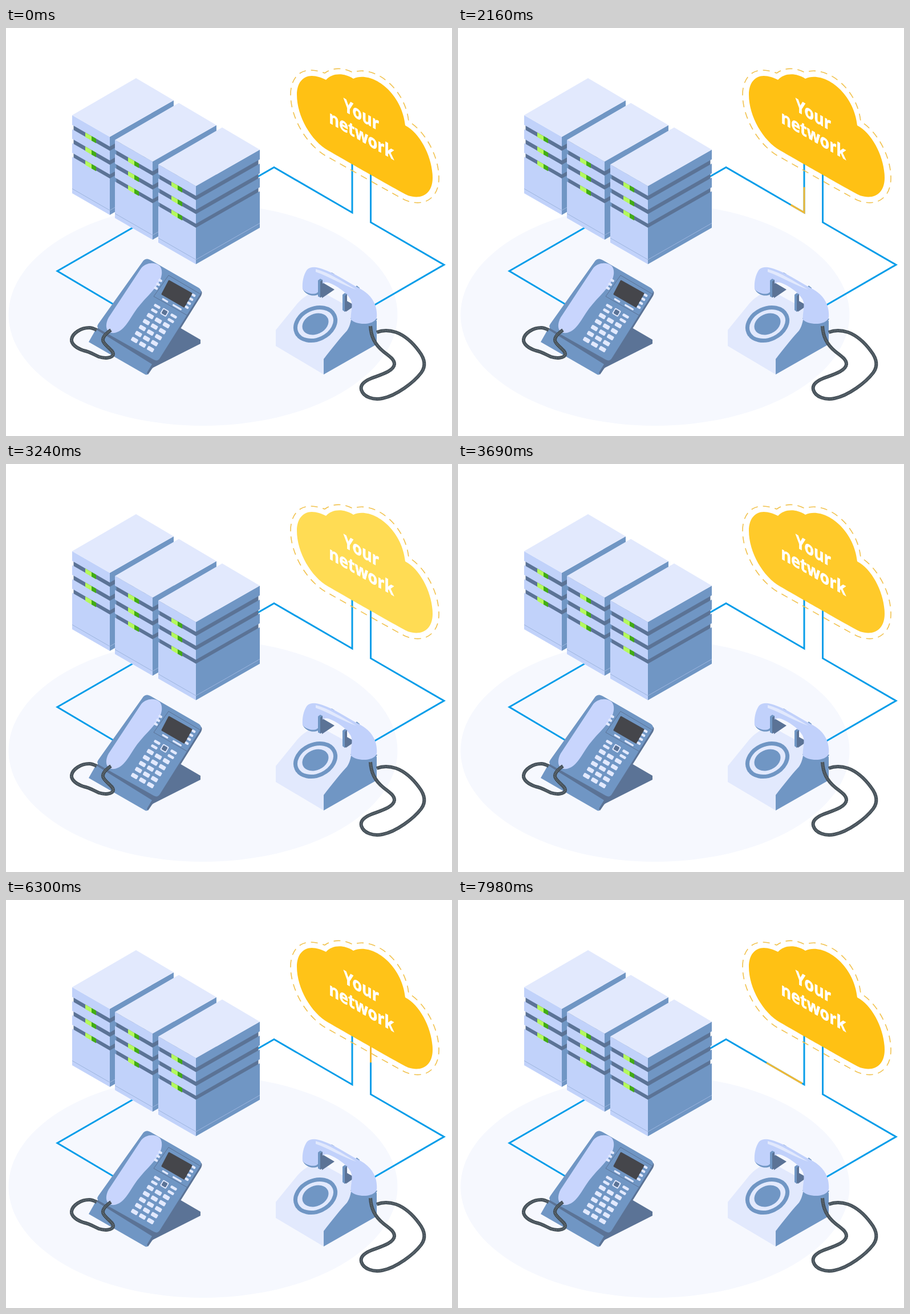
Write an HTML page that moves like this. It is 782x716 px and loops after 8 s.

```html
<!DOCTYPE html>
<html lang="en">
<head>
<meta charset="utf-8">
<title>Your network</title>
<style>
  html, body { margin: 0; width: 100%; height: 100%; overflow: hidden; background: #fff; }
  svg { display: block; width: 100%; height: 100%; }
  .pale { fill: #e2e9fd; }
  .soft { fill: #c1d2fa; }
  .mid { fill: #7096c4; }
  .dark { fill: #5b7396; }
  .wire { fill: none; stroke: #079de9; stroke-width: 3; }
  .pulse { fill: none; stroke: #f3b933; stroke-width: 3; stroke-dasharray: 72 2000; stroke-dashoffset: 72; }
  .cord { fill: none; stroke: #3f4a52; stroke-width: 6; }
  .coil { fill: none; stroke: #7d8890; stroke-width: 3.4; stroke-dasharray: .8 1.8; }
  #cloud { fill: #ffc114; }
  text { font: bold 31px "Open Sans", "Noto Sans", sans-serif; fill: #fff; stroke: #fff; stroke-width: .8; }
</style>
</head>
<body>
<svg viewBox="0 0 782 716" preserveAspectRatio="none">
  <ellipse cx="345.5" cy="503" rx="341" ry="195" fill="#f6f8fe"/>

  <g class="wire">
    <path d="M235 343L90 426.500L192 487"/>
    <path d="M436 264L470 244.500L607 324V225"/>
    <path d="M639.500 245V341L768 415.500L635 492.500"/>
  </g>
  <g id="pulses"></g>
  <g id="servers"></g>

  <g id="deskPhone">
    <path class="dark" d="M305 526L341 547V554L256 597L264 584Z"/>
    <path class="mid" d="M158 528L145 551L244 608Q248 610 251 605L262 586Z"/>
    <path class="dark" d="M158 529L162 526L268 583L256 598L249 608L247 605L256 590Z"/>
    <path class="dark" d="M342 461Q345 464 342 470L272 582Q267 589 260 586L262 580Z"/>
    <path class="mid" d="M241 408Q246 403 253 407L338 456Q344 460 341 466L270 579Q266 586 259 582L163 528Q158 525 162 519Z"/>
    <path d="M285 434L341 467L319 505L259 471Z" fill="none" stroke="#5b7396"/>
    <path d="M286 444L325 466L312 489L274 467Z" fill="#45464b" stroke="#45464b" stroke-width="3" stroke-linejoin="round"/>
    <path d="M236 423C244 411 262 410 270 418C276 426 273 440 266 450C258 462 242 476 230 492C221 504 216 515 207 525C199 534 188 538 180 533C174 528 175 517 180 508Z" fill="#c8d5fd"/>
    <g id="keys" class="pale"></g>
  </g>

  <g id="dialPhone">
    <path class="pale" d="M473 530L508 487C515 478 522 472 535 465L548 460L630 505L600 545L557 608L473 558Z"/>
    <path class="mid" d="M557 608V581C570 564 585 545 598 531C605 521 605 508 608 498L650 514V555Z"/>
    <g transform="rotate(-25 542.500 519.500)">
      <ellipse cx="542.500" cy="519.500" rx="36.500" ry="27.100" fill="none" stroke="#7096c4" stroke-width="7"/>
      <ellipse class="mid" cx="542.500" cy="519.500" rx="24" ry="17.700"/>
    </g>
    <path class="dark" d="M554 446L576 459L554 474Z"/>
    <path class="dark" d="M596 478L612 487L596 498Z"/>
    <path class="mid" d="M520 457C524 470 545 474 551 464V456Z"/>
    <path class="mid" d="M604 509C610 525 645 527 651 510Z"/>
    <path class="mid" d="M568 432L571 429L576 432V438H568ZM612 455L615 452L620 456V461H612Z"/>
    <path d="M528 424C534 418 545 419 555 423C578 431 596 444 616 455C640 466 652 485 650 508C646 522 615 522 605 512C603 500 610 488 604 476C597 464 580 452 566 447C556 444 552 450 549 460C546 470 528 468 520 458C519 445 522 432 528 424Z" fill="#c1d1fb"/>
    <path d="M543 423C568 430 590 445 614 459C592 452 566 436 543 428Z" class="pale"/>
    <path class="mid" d="M547 443L551 440L555 442V471L551 473L547 471Z"/>
    <path class="mid" d="M590 468L594 465L598 467V495L594 498L590 495Z"/>
    <path class="dark" d="M551 445L555 442V471L551 473ZM594 470L598 467V495L594 498Z"/>
  </g>

  <g id="cords"></g>

  <path d="M499 117C499 90 513 74 534 74C545 74 552 77 559 79C573 69 590 69 608 78C645 64 700 105 706 164C736 182 759 226 759 263C759 300 732 315 700 302C680 292 600 246 560 224C524 202 499 155 499 117Z" fill="none" stroke="#f1c24e" stroke-width="1.600" stroke-dasharray="12 9"/>
  <path id="cloud" d="M510 117C510 96 521 84 536 84C545 84 553 87 561 91C572 79 592 78 609 89C640 74 694 112 700 171C727 185 748 228 748 263C748 290 730 302 705 294C690 287 600 235 565 215C535 198 510 155 510 117Z"/>
  <text transform="matrix(.866 .5 0 1 592 145)">Your</text>
  <text transform="matrix(.866 .5 0 1 566.500 166)">network</text>
</svg>

<script>
const LOOP = 8000, DASH = 72, SPEED = 0.39;
const NS = 'http://www.w3.org/2000/svg';
const $ = id => document.getElementById(id);

function add(parent, tag, attrs) {
  const el = document.createElementNS(NS, tag);
  for (const k in attrs) el.setAttribute(k, attrs[k]);
  parent.append(el);
  return el;
}

// Isometric box walls between two heights, measured from the top face.
function wall(g, top, bottom, inset, left, right) {
  const x0 = inset, x1 = 178 - inset, k = 0.58 * inset;
  add(g, 'path', { class: left, d: `M${x0} ${top + k}L66 ${top + 38}V${bottom + 38}L${x0} ${bottom + k}Z` });
  add(g, 'path', { class: right, d: `M66 ${top + 38}L${x1} ${top - 26 + k}V${bottom - 26 + k}L66 ${bottom + 38}Z` });
}

function server(x, y) {
  const g = add($('servers'), 'g', { transform: `translate(${x} ${y})` });
  wall(g, 8, 84, 2.5, 'dark', 'dark');
  for (const [a, b] of [[0, 17], [24.5, 41.5], [49, 66], [73, 137]]) wall(g, a, b, 0, 'soft', 'mid');
  add(g, 'path', { class: 'pale', d: 'M0 0L112 -65L178 -26L66 38Z' });
  add(g, 'path', { d: 'M0 129L66 167L178 103', fill: 'none', stroke: '#9db5de' });
  for (let i = 0; i < 3; i++) {
    const t = 17 + i * 24.5;
    const led = (a, b, fill) => add(g, 'path', {
      fill, d: `M${a} ${t + a * .58}L${b} ${t + b * .58}v8L${a} ${t + a * .58 + 8}Z`
    });
    led(23, 34, '#b4f95c');
    led(34, 42, '#41ad13');
  }
}
[[116, 153], [191, 196.5], [267, 239.5]].forEach(p => server(...p));

function key(x, y, w, h, fill) {
  add($('keys'), 'rect', {
    x: -w / 2, y: -h / 2, width: w, height: h, rx: 1.8,
    transform: `matrix(.866 .5 -.5 .84 ${x} ${y})`, ...(fill && { fill })
  });
}
for (let r = 0; r < 5; r++)
  for (let c = 0; c < 3; c++) key(253 + 14 * c - 6.9 * r, 505.5 + 8 * c + 10.5 * r, 12, 7.5);
for (const r of [0, 1]) {
  key(265 - 5 * r, 488.5 + 8 * r, 12, 5);
  key(294 - 5 * r, 505.5 + 8 * r, 12, 5);
}
key(278, 499, 12, 12);
key(278, 499, 8.5, 8.5, '#5b7396');
for (let i = 0; i < 4; i++) {
  if (i < 3) key(270.5 - 3.8 * i, 443 + 6.8 * i, 7, 4.5);
  key(329 - 4 * i, 469 + 7 * i, 7, 4.5);
}
key(279, 478, 12, 3.5);
key(300, 490, 18, 3.5);

for (const d of [
  'M184 530C174 537 167 544 171 551C176 560 189 566 188 573C186 580 172 580 163 577C150 571 146 568 136 566C124 562 114 555 115 546C117 535 132 526 146 526C151 526 155 528 159 530',
  'M639 523C640 541 646 555 662 568C674 577 681 582 681 590C680 602 658 608 640 615C628 620 621 627 623 635C627 648 644 653 660 650C685 645 715 622 728 605C737 593 734 580 724 567C713 552 700 540 684 534C672 530 660 530 650 534'
]) {
  add($('cords'), 'path', { class: 'cord', d });
  add($('cords'), 'path', { class: 'coil', d });
}

function loop(el, frames) {
  el.animate(frames, { duration: LOOP, iterations: Infinity });
}

// Sends one yellow dash along a wire; its head enters at `start`.
function send(d, start, end, easing = 'linear') {
  const el = add($('pulses'), 'path', { class: 'pulse', d });
  const total = el.getTotalLength() + DASH;
  const stop = Math.min(end || start + total / SPEED, LOOP);
  const run = end ? total : (stop - start) * SPEED;
  const hidden = { strokeDashoffset: DASH };
  const frames = [
    { ...hidden, offset: 0 },
    { ...hidden, offset: start / LOOP, easing },
    { strokeDashoffset: DASH - run, offset: stop / LOOP }
  ];
  if (stop < LOOP) frames.push({ strokeDashoffset: DASH - run, offset: 1 });
  loop(el, frames);
}
send('M186 483.500L90 426.500L221 351', 30, 1260, 'cubic-bezier(.35,.16,.75,.7)');
send('M443 260L470 244.500L607 324V240', 1560);
send('M639.500 257V341L768 415.500L648 485', 3714);
send('M648 485L768 415.500L639.500 341V257', 5237);
send('M607 240V324L470 244.500L443 260', 7570);

const base = '#ffc114', glow = '#ffe05c';
loop($('cloud'), [
  [0, base], [2400, base], [3150, glow], [3930, base],
  [6256, base], [7006, glow], [7790, base], [LOOP, base]
].map(([t, fill]) => ({ offset: t / LOOP, fill })));
</script>
</body>
</html>
```
